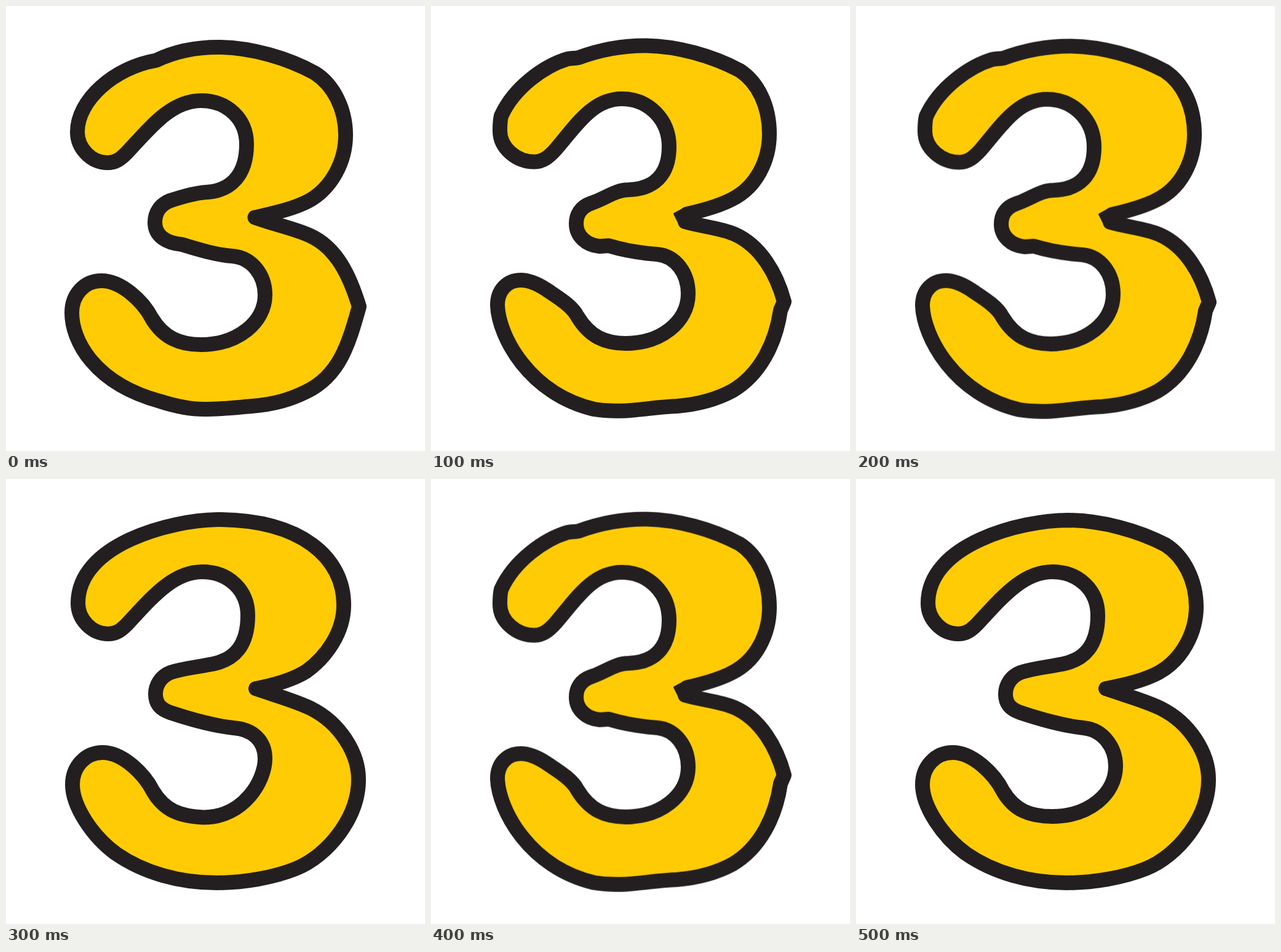
These frames come from a looping animation (681x724 px, 0.6 s). An HTML page:

```html
<!DOCTYPE html>
<html lang="en">
<head>
<meta charset="utf-8">
<title>Wobbling three</title>
<style>
html, body { margin: 0; width: 100%; height: 100%; overflow: hidden; background: #fff; }
svg { display: block; width: 100%; height: 100%; }
.body { fill: #ffcb05; stroke: #231f20; stroke-width: 24; stroke-linejoin: round; }
.nick { fill: #231f20; stroke: #231f20; stroke-width: 3; stroke-linejoin: round; }
</style>
</head>
<body>
<svg id="stage" viewBox="0 0 681 724"></svg>
<script>
// Each outline runs anticlockwise from the crown: hook, middle arm, bowl, base, right side.
const smooth = {
  hook: `C268 67 117 106 117 202 C117 228 139 252 166 252 C180 252 188 245 197 236
    C237 193 271 151 319 151 C362 151 393 181 393 222 C393 271 371 294 336 301`,
  arm: `C310 306 283 309 267 315 C252 321 243 335 243 350 C243 366 252 375 267 380
    C300 391 334 401 370 405`,
  base: `C284 549 258 540 239 508 C225 480 190 445 157 445 C129 445 108 468 108 497
    C108 532 140 581 178 609 C224 641 282 657 342 657 C385 657 434 649 471 634
    C523 613 573 551 573 489 C573 446 543 397 495 373 C468 360 437 352 406 341`
};
const roundBowl = 'C401 408 422 436 422 467 C422 512 379 549 319 549';
const tiltBowl = 'C401 407 421 426 421 455 C421 490 387 550.5 321 550.5';
const squareTop = 'C432 336 466 329 492 315 C530 294 553 250 553 208 C553 165 533 126 503 107 C459 84 400 67.5 345 67Z';
const roundTop = 'C432 336 464 328 488 313 C520 290 549 250 549 205 C549 128 480 66 343 66Z';

const calm = (start, bowl, top) => start + smooth.hook + smooth.arm + bowl + smooth.base + top;

const bent = [
  `M345 67 C305 67 270 76 244 88.5 C176 100 116 153 116 205 C116 231 138 255 165 255
    C179 255 187 248 196 239 C236 196 269 154 317 154 C360 154 391 184 391 225
    C391 274 366 301 325 303`,
  `C308 304 284 311 266 317 C251 323 242 336 242 352 C242 375 262 386 286 388
    C312 396 341 405 369 407 C400 410 421 438 421 470 C421 514 377 551 317 551`,
  `C283 551 256 540 237 508 C223 481 188 447 155 447 C127 447 107 470 107 499
    C107 545 144 614 250 643 C275 651 298 656 322 656 C355 656 385 652 400 651
    C437 648 463 640 489 627 C542 601 557 550 574 489`,
  `C559 440 538 394 495 374 C470 362 434 355 404.5 344 C430 338 466 331 492 317
    C530 296 552 252 552 210 C552 167 532 128 502 109 C458 85 400 67.5 345 67Z`
].join('');

const rough = [
  `M348 64.5 C310 64.5 275 71 240 84 C235 85 228 85 222 86 C185 97 135 132 114 179
    C112 187 112 195 112 203 C112 231 139 253.5 168 253.5 C182 253.5 192 245 202 234
    C235 196 262 151 310 151 C353 151 387 184 387 229 C387 275 362 298 321 299`,
  `C300 299 284 313 260 321 C243 327 236 340 236 354 C236 374 252 389 274 391 L289 390
    C312 397 340 402 368 404 C398 407 418 435 418 468 C418 515 372 549 317 549`,
  `C283 549 258 538 238 505 C229 487 203 472 187 461 C173 452 160 446 146 446
    C124 446 108 462 108 487 C110 538 160 631 265 656 C312 664 350 653 400 651
    C437 648 464 640 490 626 C534 600 560 550 568 495 L574 481`,
  `C562 436 536 390 493 371 C470 361 441 359 413 351 L416 338.5 C440 333 468 326 490 314
    C528 295 550 252 550 208 C550 162 531 124 502 105 C457 81 400 65 348 64.5Z`
].join('');

const nick = 'M395.5 338 L413 328.5 L414 360 L408 358.5 L404 355Z';
const level = calm('M345 67', roundBowl, squareTop);
const round = calm('M343 66', tiltBowl, roundTop);

// [outline, vertical shift, notch detail]
const poses = [
  [bent, 0],
  [rough, 0, nick],
  [rough, 0.7, nick],
  [round, 0],
  [rough, 0.7, nick],
  [level, 0]
];
const STEP = 100;
const stage = document.getElementById('stage');

function add(parent, tag, attrs) {
  const el = document.createElementNS('http://www.w3.org/2000/svg', tag);
  for (const key in attrs) el.setAttribute(key, attrs[key]);
  return parent.appendChild(el);
}

poses.forEach(([outline, dy, detail], i) => {
  const g = add(stage, 'g', { transform: `translate(0 ${dy})` });
  add(g, 'path', { class: 'body', d: outline });
  if (detail) add(g, 'path', { class: 'nick', d: detail });
  const keys = [...poses, poses[0]].map((_, k) => ({
    opacity: k === i ? 1 : 0,
    offset: k / poses.length,
    easing: 'step-end'
  }));
  g.animate(keys, { duration: STEP * poses.length, iterations: Infinity });
});
</script>
</body>
</html>
```
